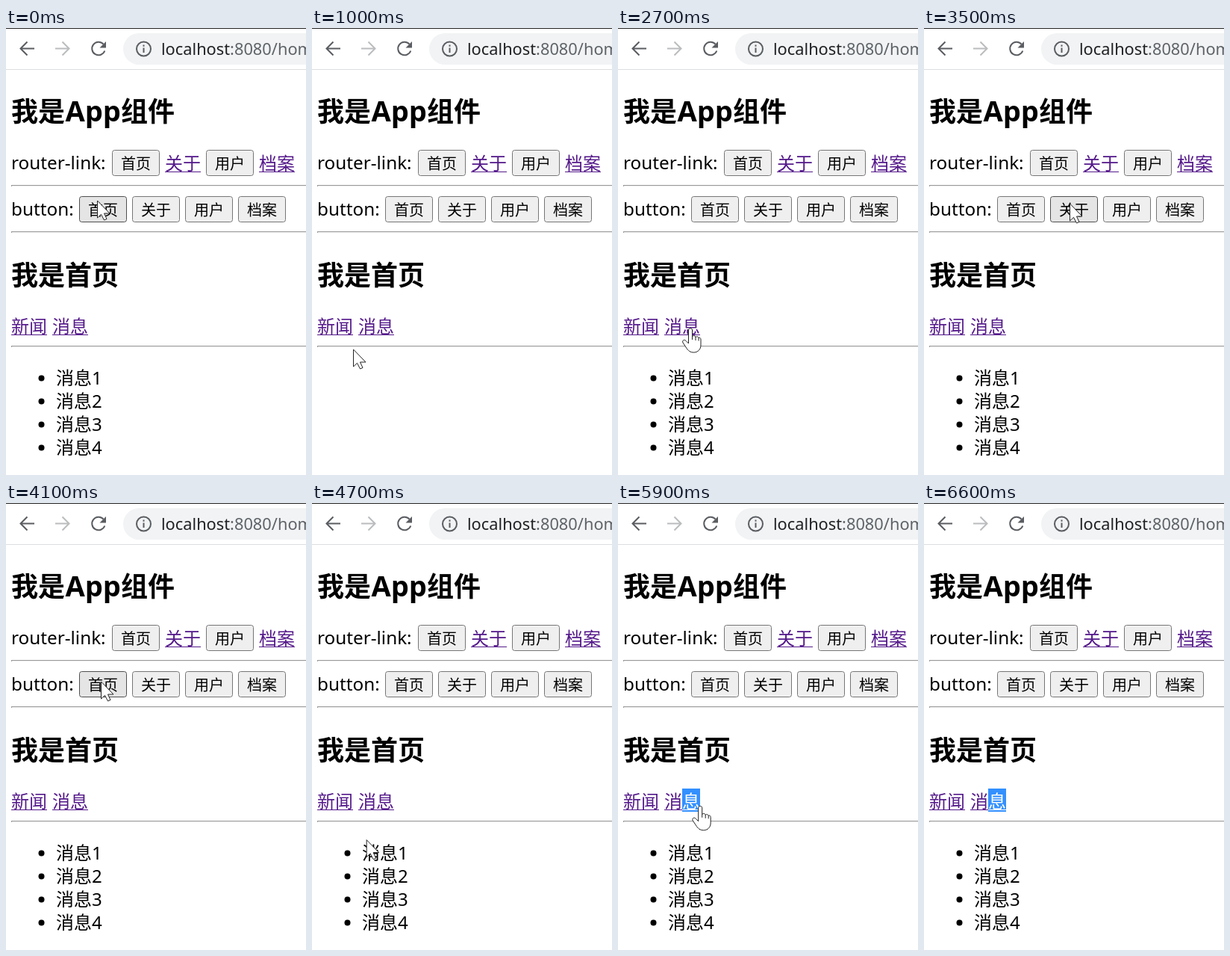
Recreate the animation shown at these times as an HTML page. Size 402x598 px, loop 7 s.

```html
<!DOCTYPE html>
<html lang="zh-CN">
<head>
<meta charset="utf-8">
<title>router demo</title>
<style>
  html, body { margin: 0; width: 100%; height: 100%; overflow: hidden; background: #fff; }
  svg { display: block; width: 402px; height: 598px; }
  text { font-family: "Noto Sans", "Noto Sans CJK SC", "Noto Sans CJK", sans-serif; font-size: 24px; white-space: pre; }
  .latin { font-size: 24.3px; }
  .h { font-size: 36px; font-weight: 700; }
  .h.latin { font-size: 38px; }
  .btn rect { fill: #efefef; stroke: #767676; }
  .btn text { font-size: 20px; font-weight: 350; }
  .btn.hover rect { fill: #e5e5e5; stroke: #4f4f4f; }
  .link { fill: #551a8b; }
  .link text { font-weight: 350; }
  .link.red { fill: #e01010; }
  .url { font-size: 21.8px; fill: #5f6368; }
  .icon { fill: none; stroke: #5a5d61; stroke-width: 2; }
  .icon .off { stroke: #babcbe; }
  .icon .tip { fill: #5a5d61; stroke: none; }
  .sel { fill: #3390ff; }
  .cursor { fill: #fff; stroke: #222; stroke-width: 1; stroke-linejoin: round; }
</style>
</head>
<body>
<svg id="stage" viewBox="0 0 402 598">
  <rect width="402" height="1" fill="#222"/>
  <rect y="55" width="402" height="1" fill="#dcdee0"/>
  <rect x="157" y="7" width="300" height="42" rx="21" fill="#f1f3f4"/>
  <g class="icon">
    <path d="M38 27.5H20M28.5 18.5L19.5 27.5L28.5 36.5"/>
    <path class="off" d="M66 27.5H84M75.5 18.5L84.5 27.5L75.5 36.5"/>
    <path d="M130.5 21.5A8.8 8.8 0 1 0 132.3 30.5"/>
    <path class="tip" d="M134 18V26.5H125.5Z"/>
    <circle cx="184.5" cy="28" r="9.5"/>
    <path d="M184.5 26.5V33M184.5 22.5V24.7"/>
  </g>
  <text class="url" x="208" y="36"><tspan fill="#202124">localhost</tspan>:8080/<tspan id="route">home</tspan></text>
</svg>
<script>
const stage = document.getElementById('stage');
const route = document.getElementById('route');

function add(parent, tag, attrs, text) {
  const el = document.createElementNS('http://www.w3.org/2000/svg', tag);
  for (const k in attrs) el.setAttribute(k, attrs[k]);
  if (text) el.textContent = text;
  parent.append(el);
  return el;
}
const group = (parent = stage) => add(parent, 'g', {});
const label = (parent, x, y, text, cls = '') => add(parent, 'text', { x, y, class: cls }, text);

function hr(parent, y) {
  add(parent, 'rect', { x: 7, y, width: 395, height: 1, fill: '#9a9a9a' });
  add(parent, 'rect', { x: 7, y: y + 1, width: 395, height: 1, fill: '#eeeeee' });
  add(parent, 'rect', { x: 7, y, width: 1, height: 2, fill: '#9a9a9a' });
}
function button(x, y, text) {
  const g = add(stage, 'g', { class: 'btn' });
  add(g, 'rect', { x: x + 0.5, y: y + 0.5, width: 63, height: 34, rx: 3 });
  label(g, x + 12, y + 25.5, text);
  return { g, x, y };
}
function link(parent, x, y, text) {
  const g = add(parent, 'g', { class: 'link' });
  label(g, x, y, text);
  add(g, 'rect', { x, y: y + 2, width: 48, height: 1 });
  return g;
}
function list(parent, name) {
  const g = group(parent);
  g.rows = [1, 2, 3, 4].map(n => {
    const y = 446 + n * 31;
    add(g, 'circle', { cx: 47.5, cy: y - 8.5, r: 4 });
    return label(g, 67, y, name + n);
  });
  return g;
}

// header and navigation
label(stage, 7, 125, '我是', 'h');
label(stage, 79.5, 125, 'App', 'h latin');
label(stage, 154, 125, '组件', 'h');
label(stage, 7, 189, 'router-link:', 'latin');
button(142, 163, '首页');
link(stage, 213, 190, '关于');
button(268, 163, '用户');
link(stage, 339, 190, '档案');
hr(stage, 210);
label(stage, 7, 251, 'button:', 'latin');
const buttons = ['首页', '关于', '用户', '档案'].map((t, i) => button(98 + i * 71, 225, t));
hr(stage, 272);

// pages
const about = group();
label(about, 7, 344, '我是关于', 'h');
const home = group();
label(home, 7, 344, '我是首页', 'h');
const newsLink = link(home, 7, 408, '新闻');
const msgLink = link(home, 62, 408, '消息');
const linkSel = group(home);
add(linkSel, 'rect', { x: 86, y: 382, width: 24, height: 31, class: 'sel' });
label(linkSel, 86, 408, '息').style.fill = '#fff';
add(linkSel, 'rect', { x: 86, y: 410, width: 24, height: 1, fill: '#fff' });
hr(home, 425);
const rowSel = add(home, 'rect', { x: 67, y: 452, width: 62, height: 31, class: 'sel' });
const news = list(home, '新闻');
const msgs = list(home, '消息');

const arrow = add(stage, 'path', {
  class: 'cursor',
  d: 'M.5 0V23L5.5 18.3L9.5 26L13 24.5L9.5 17H17Z'
});
const hand = add(stage, 'path', {
  class: 'cursor',
  d: 'M-2.5 2C-2.5 -1 2.5 -1 2.5 2V11C3 9 7 9 7 12C7.5 10 11 10.5 11 13' +
     'C11.5 11.5 14 12 14 15V22C14 28 10 32 4.5 32C0 32 -3 30 -6 25' +
     'L-10 19C-11.5 16 -8 14 -6 16.5L-2.5 20ZM2.5 11V15M7 12V16M11 13V16.5'
});

// time, x, y
const path = [
  [0, 122, 231], [500, 122, 231], [1000, 55, 430], [1100, 54, 428], [1500, 50, 404],
  [2000, 50.5, 404], [2400, 95, 403], [2700, 97, 402], [3500, 195, 235], [3800, 195, 235],
  [4100, 127, 239], [4300, 128, 318], [4500, 126, 492], [4800, 46, 430], [5000, 44, 406],
  [5100, 44, 406], [5200, 105, 406], [5300, 111, 406], [5700, 109, 405], [6200, 112, 407],
  [6600, 300, 620], [7000, 300, 620]
];
const views = [
  [0, 'msgs'], [500, 'none'], [1900, 'news'], [2500, 'msgs'], [3600, 'about'],
  [4000, 'msgs'], [5100, 'news'], [5200, 'msgs']
];

function cursorAt(t) {
  const i = path.findIndex(k => k[0] > t);
  const [a, x0, y0] = path[i - 1], [b, x1, y1] = path[i];
  const p = (t - a) / (b - a);
  return [x0 + (x1 - x0) * p, y0 + (y1 - y0) * p];
}
const within = (v, a, b) => v >= a && v < b;
const show = (el, on) => el.style.display = on ? '' : 'none';

function draw(t) {
  const view = views.filter(v => v[0] <= t).pop()[1];
  const isAbout = view === 'about';
  route.textContent = isAbout ? 'about' : 'home';
  show(about, isAbout);
  show(home, !isAbout);
  show(news, view === 'news');
  show(msgs, view === 'msgs');

  newsLink.classList.toggle('red', within(t, 1700, 2000) || within(t, 5000, 5100));
  msgLink.classList.toggle('red', within(t, 2400, 2500));
  const picked = within(t, 5200, 5900);
  show(rowSel, picked);
  msgs.rows[0].style.fill = picked ? '#fff' : '';
  show(linkSel, t >= 5900);

  const [x, y] = cursorAt(t);
  const onLink = !isAbout && within(y, 388, 412) && (within(x, 7, 55) || within(x, 62, 115));
  show(hand, onLink);
  show(arrow, !onLink);
  (onLink ? hand : arrow).setAttribute('transform', `translate(${x} ${y})`);
  for (const b of buttons) {
    b.g.classList.toggle('hover', within(x, b.x, b.x + 64) && within(y, b.y, b.y + 35));
  }
}

const start = performance.now();
function tick() {
  const t = (performance.now() - start) % 7000;
  draw(Math.floor(t / 100) * 100);
  requestAnimationFrame(tick);
}
tick();
</script>
</body>
</html>
```
